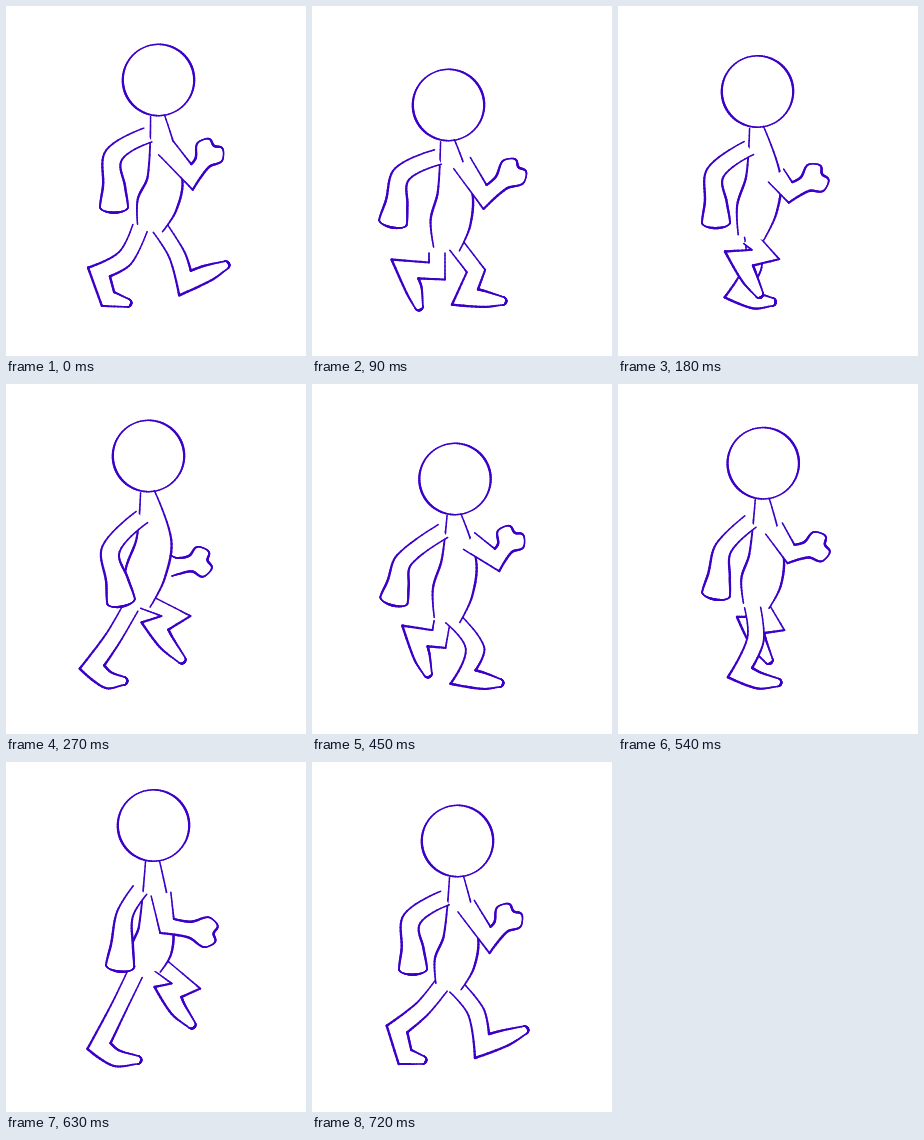
Animation, 300 px wide and 350 px high, one loop 0.81 s. Source, as an HTML page with a canvas:

```html
<!DOCTYPE html>
<html lang="en">
<head>
<meta charset="utf-8">
<title>Walk cycle</title>
<style>
  html, body { margin: 0; width: 100%; height: 100%; overflow: hidden; background: #fff; }
  canvas { display: block; }
</style>
</head>
<body>
<canvas id="stage" width="300" height="350"></canvas>
<script>
const STEP = 90, STEPS = 9, HEAD_RADIUS = 35.7;
const INK = '#3c00c8', PAPER = '#fff';
const ctx = document.getElementById('stage').getContext('2d');

// Half widths at the joints; the cap closes the last joint (depth: how far it bulges, notch: gap between knuckles).
const LEG = { widths: [8, 8, 9, 8, 4], cap: { depth: 0.8, notch: 0 } };
const BACK_ARM = { widths: [8, 8, 11, 14], cap: { depth: 0.4, notch: 0 } };
const FRONT_ARM = { widths: [10, 8, 8, 15], cap: { depth: 0.9, notch: 0.35 } };
const TORSO = { widths: [7, 17, 20, 13] };

// Joints of the key poses. Arms: shoulder, elbow, hand. Legs: hip, knee, ankle, ball, toe.
const keys = [
  { step: 0, head: [152.5, 74], chest: [159, 172],
    backArm: [[142, 129], [108, 149], [108, 201]], frontArm: [[160, 142], [186, 171], [203, 147]],
    farLeg: [[154, 222], [171, 249], [179, 277], [202, 267], [220, 259]],
    nearLeg: [[134, 222], [119, 252], [93, 266], [102, 293], [122, 297]] },
  { step: 1, head: [136.5, 99], chest: [143, 186],
    backArm: [[126, 151], [90, 168], [81, 216]], frontArm: [[150, 157], [173, 191], [200, 167]],
    farLeg: [[144, 239], [164, 265], [153, 291], [172, 293], [191, 295]],
    nearLeg: [[125, 247], [125, 265], [93, 263], [102, 284], [107, 301]] },
  { step: 3, head: [142.5, 72], chest: [148, 155],
    backArm: [[136, 133], [105, 165], [115, 217]], frontArm: [[166, 182], [172, 182], [193, 178]],
    farLeg: [[125, 223], [107, 254], [86, 283], [102, 296], [118, 297]],
    nearLeg: [[138, 217], [170, 232], [149, 242], [160, 258], [176, 276]] },
  { step: 5, head: [143, 95], chest: [147, 176],
    backArm: [[131, 147], [92, 176], [82, 216]], frontArm: [[157, 157], [185, 176], [198, 156]],
    farLeg: [[130, 238], [127, 255], [103, 252], [110, 273], [116, 290]],
    nearLeg: [[140, 234], [163, 264], [151, 293], [172, 297], [188, 299]] },
  { step: 7, head: [147.5, 63.5], chest: [150, 166],
    backArm: [[134, 128], [119, 152], [114, 204]], frontArm: [[155, 132], [161, 164], [199, 170]],
    farLeg: [[154, 203], [180, 224], [162, 230], [172, 247], [186, 263]],
    nearLeg: [[129, 212], [112, 247], [93, 284], [110, 296], [132, 298]] },
  { step: 8, head: [145.5, 79], chest: [149, 175],
    backArm: [[133, 136], [100, 157], [101, 207]], frontArm: [[154, 144], [178, 178], [196, 156]],
    farLeg: [[144, 225], [164, 250], [170, 284], [193, 276], [213, 268]],
    nearLeg: [[129, 224], [110, 247], [85, 267], [93, 295], [111, 298]] },
];

// Blends numbers and nested lists of numbers alike.
const mix = (a, b, t) => Array.isArray(a) ? a.map((v, i) => mix(v, b[i], t)) : a + (b - a) * t;

const along = ([ax, ay], [bx, by]) => {
  const length = Math.hypot(bx - ax, by - ay) || 1;
  return [(bx - ax) / length, (by - ay) / length];
};

function poseAt(step) {
  const next = keys.findIndex(key => key.step >= step);
  const to = keys[next], from = keys[Math.max(next - 1, 0)];
  const t = to === from ? 0 : (step - from.step) / (to.step - from.step);
  return Object.fromEntries(Object.keys(to).map(part => [part, mix(from[part], to[part], t)]));
}

// Points on one side of a chain of joints, mitred where it bends; sharp bends become corners.
function sideOf(joints, widths, sign) {
  return joints.map((joint, i) => {
    const last = joints.length - 1;
    const into = along(joints[Math.max(i - 1, 0)], joints[Math.max(i, 1)]);
    const out = along(joints[Math.min(i, last - 1)], joints[Math.min(i + 1, last)]);
    const [dx, dy] = along([0, 0], [into[0] + out[0], into[1] + out[1]]);
    const reach = sign * widths[i] / Math.max(0.55, dx * into[0] + dy * into[1]);
    const corner = into[0] * out[0] + into[1] * out[1] < 0.5;
    return { x: joint[0] + dy * reach, y: joint[1] - dx * reach, corner };
  });
}

function capOf(joints, width, { depth, notch }) {
  const [before, end] = joints.slice(-2);
  const [dx, dy] = along(before, end);
  return [60, 30, 0, -30, -60].map(degrees => {
    const angle = degrees * Math.PI / 180;
    const radius = width * (1 - notch * Math.max(0, Math.cos(3 * angle)));
    const forward = radius * depth * Math.cos(angle), aside = radius * Math.sin(angle);
    return { x: end[0] + dx * forward + dy * aside, y: end[1] + dy * forward - dx * aside };
  });
}

// Unit direction of the smooth curve at a point; none at corners and ends.
function heading(points, i) {
  const before = points[i - 1], after = points[i + 1];
  return before && after && !points[i].corner ? along([before.x, before.y], [after.x, after.y]) : [0, 0];
}

function smooth(points, detail = 10) {
  const samples = [points[0]];
  for (let i = 0; i + 1 < points.length; i++) {
    const a = points[i], b = points[i + 1];
    const reach = Math.hypot(b.x - a.x, b.y - a.y) / 3;
    const ha = heading(points, i), hb = heading(points, i + 1);
    const bezier = (p, q, dp, dq, t) => {
      const u = 1 - t;
      return u ** 3 * p + 3 * u * u * t * (p + dp * reach) + 3 * u * t * t * (q - dq * reach) + t ** 3 * q;
    };
    for (let k = 1; k <= detail; k++) {
      const t = k / detail;
      samples.push({ x: bezier(a.x, b.x, ha[0], hb[0], t), y: bezier(a.y, b.y, ha[1], hb[1], t) });
    }
  }
  return samples;
}

// Brush line that swells and thins along its way.
function ink(samples, swells) {
  for (let i = 1; i < samples.length; i++) {
    ctx.lineWidth = 1.4 + Math.sin(i / samples.length * Math.PI * swells) ** 2;
    ctx.beginPath();
    ctx.moveTo(samples[i - 1].x, samples[i - 1].y);
    ctx.lineTo(samples[i].x, samples[i].y);
    ctx.stroke();
  }
}

function drawChain(joints, { widths, cap }) {
  const left = sideOf(joints, widths, 1);
  const right = sideOf(joints, widths, -1).reverse();
  const lines = cap
    ? [smooth([...left, ...capOf(joints, widths.at(-1), cap), ...right])]
    : [smooth(left), smooth(right)];
  ctx.beginPath();
  lines.flat().forEach(({ x, y }) => ctx.lineTo(x, y));
  ctx.fill();
  lines.forEach(line => ink(line, cap ? 3 : 1));
}

const withWrist = ([shoulder, elbow, hand]) => [shoulder, elbow, mix(elbow, hand, 0.6), hand];

function drawHead([cx, cy]) {
  const samples = Array.from({ length: 91 }, (_, i) => {
    const angle = i / 45 * Math.PI - 2;
    return { x: cx + HEAD_RADIUS * Math.cos(angle), y: cy + HEAD_RADIUS * Math.sin(angle) };
  });
  ink(samples, 2);
}

function drawWalker({ head, chest, backArm, frontArm, farLeg, nearLeg }) {
  ctx.fillStyle = PAPER;
  ctx.fillRect(0, 0, 300, 350);
  ctx.strokeStyle = INK;
  ctx.lineCap = 'round';
  const neck = [head[0] - 1, head[1] + HEAD_RADIUS];
  const hips = mix(farLeg[0], nearLeg[0], 0.5);
  drawChain(farLeg, LEG);
  drawChain(nearLeg, LEG);
  drawChain([neck, chest, mix(chest, hips, 0.54), hips], TORSO);
  drawChain(withWrist(backArm), BACK_ARM);
  drawChain(withWrist(frontArm), FRONT_ARM);
  drawHead(head);
}

let shown = -1;
function tick() {
  const step = Math.floor(performance.now() / STEP) % STEPS;
  if (step !== shown) drawWalker(poseAt(shown = step));
  requestAnimationFrame(tick);
}
tick();
</script>
</body>
</html>
```
